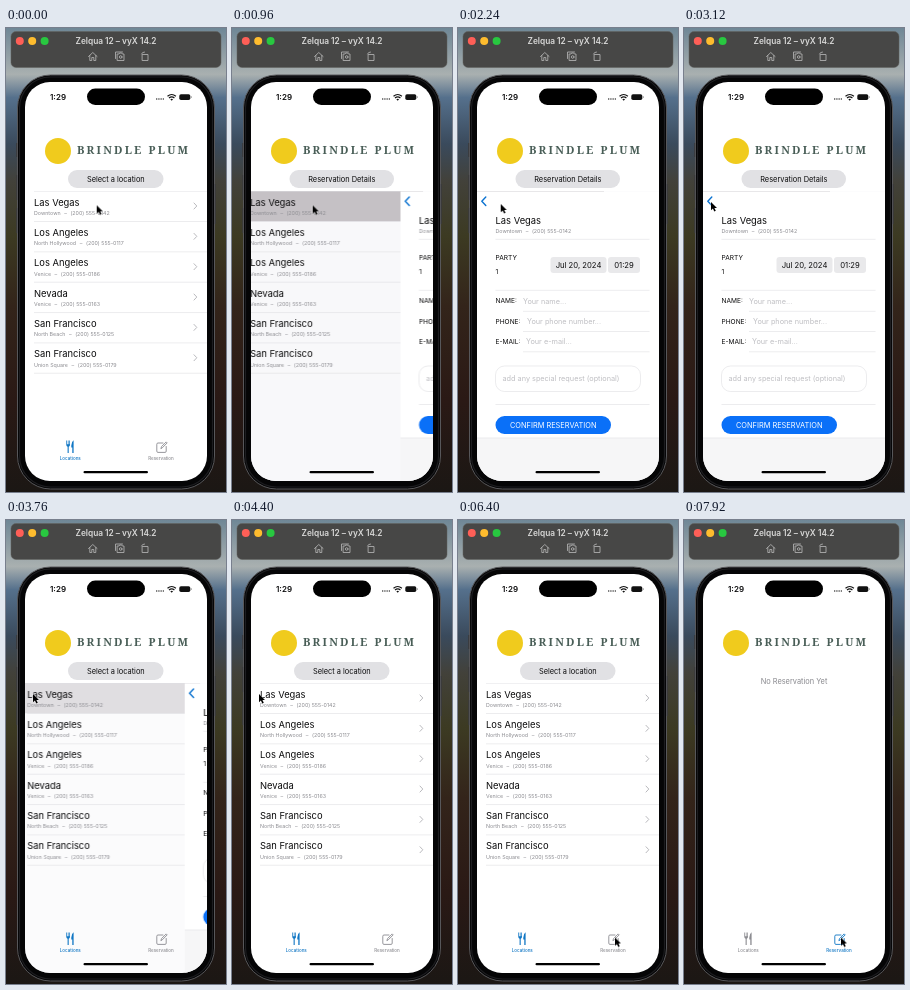
Write an HTML page that moves like this. It is 220 px wide and 464 px high and loops after 8 s.

```html
<!DOCTYPE html>
<html lang="en">
<head>
<meta charset="utf-8">
<title>Reservation app</title>
<style>
html, body { margin: 0; width: 100%; height: 100%; overflow: hidden; background: #1c1914; }
svg { display: block; width: 220px; height: 464px; }
text { font-family: Inter, Roboto, sans-serif; fill: #0c0c0d; }
.mid { text-anchor: middle; }
.city { font-size: 9.4px; }
.sub { font-size: 5.3px; fill: #8b8b90; }
.body { font-size: 7.4px; }
.label { font-size: 6.6px; }
.hint { font-size: 7.3px; fill: #bfbfc3; }
.tab { font-size: 4.5px; text-anchor: middle; font-weight: 500; }
.line { stroke: #dfdfe2; stroke-width: .6; fill: none; }
.icon { fill: none; stroke: #adadad; stroke-width: .9; stroke-linejoin: round; stroke-linecap: round; }
.tint { color: #0f76c4; }
.idle { color: #8c8c91; }
.tint text, .idle text { fill: currentColor; }

.list, .detail, .dim, .pressed, .bar, .pick, .info, .first, .second, .cursor {
  animation: 8s linear infinite;
}
.list { animation-name: list; }
.detail { animation-name: detail; }
.dim { animation-name: dim; }
.pressed { animation-name: pressed; }
.bar { animation-name: bar; }
.pick { animation-name: pick; }
.info { animation-name: info; }
.first { animation-name: first; }
.second { animation-name: second; }
.cursor { animation-name: cursor; }
.info, .bar, .pick { animation-timing-function: step-end; }
.first, .second { animation-timing-function: step-end; }

@keyframes list {
  0%, 11.4% { transform: none; animation-timing-function: cubic-bezier(.3, .5, .2, 1); }
  18%, 43.8% { transform: translateX(-55px); animation-timing-function: cubic-bezier(.3, .5, .2, 1); }
  50.4%, 100% { transform: none; }
}
@keyframes detail {
  0%, 11.4% { transform: translateX(182px); animation-timing-function: cubic-bezier(.3, .5, .2, 1); }
  18%, 43.8% { transform: none; animation-timing-function: cubic-bezier(.3, .5, .2, 1); }
  50.4%, 100% { transform: translateX(182px); }
}
@keyframes dim {
  0%, 11.3% { opacity: 0; }
  11.8%, 43.8% { opacity: 1; }
  50.4%, 100% { opacity: 0; }
}
@keyframes pressed {
  0%, 10.4% { opacity: 0; }
  10.9%, 44% { opacity: 1; }
  50%, 100% { opacity: 0; }
}
@keyframes bar { 0% { opacity: 1; } 11.4% { opacity: 0; } 43.8%, 100% { opacity: 1; } }
@keyframes pick { 0% { opacity: 1; } 11.4% { opacity: 0; } 43.8% { opacity: 1; } 88%, 100% { opacity: 0; } }
@keyframes info { 0% { opacity: 0; } 11.4% { opacity: 1; } 43.8%, 100% { opacity: 0; } }
@keyframes first { 0% { opacity: 1; } 88%, 100% { opacity: 0; } }
@keyframes second { 0% { opacity: 0; } 88%, 100% { opacity: 1; } }
@keyframes cursor {
  0%, 2% { transform: translate(90.7px, 177.3px); animation-timing-function: ease-in-out; }
  8%, 19% { transform: translate(80.7px, 177.3px); animation-timing-function: ease-in-out; }
  27%, 30% { transform: translate(42.7px, 176px); animation-timing-function: ease-in-out; }
  37%, 57% { transform: translate(27px, 174px); animation-timing-function: ease-in-out; }
  77%, 100% { transform: translate(157px, 417.5px); }
}
</style>
</head>
<body>
<svg viewBox="0 0 220 464">
  <defs>
    <linearGradient id="land" x2="0" y2="1">
      <stop offset="0" stop-color="#6f8796"/>
      <stop offset=".1" stop-color="#a9b0b0"/>
      <stop offset=".15" stop-color="#55708c"/>
      <stop offset=".25" stop-color="#3a4a5c"/>
      <stop offset=".33" stop-color="#42413a"/>
      <stop offset=".45" stop-color="#3c3a22"/>
      <stop offset=".6" stop-color="#33241a"/>
      <stop offset=".8" stop-color="#2a1915"/>
      <stop offset="1" stop-color="#1b1714"/>
    </linearGradient>
    <clipPath id="screen"><rect x="19" y="54" width="182" height="399" rx="25"/></clipPath>
    <g id="fork" fill="currentColor">
      <path d="M60.3 412.5v4.2q0 1.6 1.3 2v6.3h1.1v-6.3q1.3-.4 1.3-2v-4.2h-.7v3.8h-.8v-3.8h-.7v3.8h-.8v-3.8z"/>
      <path d="M67.6 412.2q-2.3 1.600-2.3 5.200v2h1v5.600h1.300z"/>
    </g>
    <g id="note" fill="none" stroke="currentColor" stroke-width=".9" stroke-linejoin="round" stroke-linecap="round">
      <path d="M157 415h-5q-1.200 0-1.200 1.200v7q0 1.200 1.200 1.200h7q1.200 0 1.200-1.200v-4.700"/>
      <path d="M155 420.300l.5-1.700 4.700-4.700 1 1-4.700 4.700z"/>
    </g>
  </defs>

  <rect width="220" height="464" fill="url(#land)"/>

  <!-- simulator toolbar -->
  <rect x="5" y="3.500" width="210" height="36" rx="5" fill="#474746" stroke="#62625f" stroke-width=".5"/>
  <circle cx="13.800" cy="13" r="4" fill="#fe5f57"/>
  <circle cx="26.200" cy="13" r="4" fill="#febc2e"/>
  <circle cx="38.600" cy="13" r="4" fill="#28c840"/>
  <text class="mid" x="110" y="16" font-size="8.300" font-weight="600" style="fill:#d9d9d8">Zelqua 12 – vyX 14.2</text>
  <g class="icon">
    <path d="M82.500 28.500l4.300-4 4.300 4M83.800 27.500v5h2v-3h2v3h2v-5"/>
    <path d="M109.500 30.500v-6.500h7M111.500 26h1.500l.7-1h2l.7 1h1.600v6.500h-6.500z"/>
    <circle cx="114.700" cy="29" r="1.300"/>
    <path d="M136.500 26.500h5.500v6h-5.500zM135.500 26q.5-2 3-2"/>
  </g>

  <!-- phone body -->
  <rect x="11.500" y="47" width="197" height="414" rx="33" fill="#050506" stroke="#57575a" stroke-width="1"/>
  <rect x="13.500" y="49" width="193" height="410" rx="31" fill="none" stroke="#1d1d20" stroke-width="1.200"/>
  <path d="M10.700 115v14M10.700 147v25M10.700 180v25M209.300 156v40" stroke="#3a3a3c" stroke-width="1"/>

  <g clip-path="url(#screen)">
    <rect x="19" y="54" width="182" height="399" fill="#fff"/>

    <g class="first">
      <rect class="dim" x="19" y="163" width="182" height="290" fill="#f8f8fa"/>
      <g class="list">
        <rect class="pressed" x="19" y="163" width="182" height="30.300" fill="#c5c1c5"/>
        <path class="line" d="M28 163.300h173"/>
        <g id="rows"></g>
      </g>

      <g class="detail">
        <rect x="19" y="163.500" width="182" height="290" fill="#fff"/>
        <path d="M27.800 169l-4 4.200 4 4.200" fill="none" stroke="#0a72d0" stroke-width="1.400" stroke-linecap="round" stroke-linejoin="round"/>
        <text class="city" x="37.500" y="195.600">Las Vegas</text>
        <text class="sub" x="37.500" y="205">Downtown<tspan dx="3.600">–</tspan><tspan dx="3.600">(200) 555-0142</tspan></text>
        <path class="line" d="M37.500 211.300h154M37.500 262.300h154M65 283.300h126.500M65 303.500h126.500M65 323.800h126.500M37.500 376.500h154"/>
        <text class="label" x="37.500" y="232.400">PARTY</text>
        <text class="label" x="37.500" y="246">1</text>
        <rect x="92.500" y="229" width="56" height="16" rx="3" fill="#e9e9eb"/>
        <rect x="150" y="229" width="32" height="16" rx="3" fill="#e9e9eb"/>
        <text class="mid" x="120.500" y="239.800" font-size="7.700">Jul 20, 2024</text>
        <text class="mid" x="166" y="239.800" font-size="7.700">01:29</text>
        <text class="label" x="37.500" y="275.400">NAME:</text>
        <text class="hint" x="65" y="275.600">Your name...</text>
        <text class="label" x="37.500" y="295.700">PHONE:</text>
        <text class="hint" x="69" y="295.900">Your phone number...</text>
        <text class="label" x="37.500" y="316">E-MAIL:</text>
        <text class="hint" x="68" y="316.200">Your e-mail...</text>
        <rect class="line" x="37.500" y="338" width="145" height="25.500" rx="9"/>
        <text class="hint" x="44.500" y="353">add any special request (optional)</text>
        <rect x="37.500" y="388" width="115.500" height="18" rx="9" fill="#0a70f8"/>
        <text class="mid body" x="95.200" y="399.700" style="fill:#fff">CONFIRM RESERVATION</text>
        <rect x="19" y="410" width="182" height="43" fill="#f6f6f7"/>
        <path class="line" d="M19 410h182"/>
      </g>
    </g>

    <!-- header -->
    <circle cx="52" cy="123" r="13" fill="#f0cb1d"/>
    <text x="71" y="126" font-size="11" font-weight="700" letter-spacing="2.200" style="font-family:'Noto Serif',serif;fill:#495e57">BRINDLE PLUM</text>
    <g class="pick">
      <rect x="62" y="142" width="95.500" height="18" rx="9" fill="#e1e1e4"/>
      <text class="mid body" x="109.800" y="153.700">Select a location</text>
    </g>
    <g class="info">
      <rect x="57.500" y="142" width="104.500" height="18" rx="9" fill="#e1e1e4"/>
      <text class="mid body" x="109.800" y="153.700">Reservation Details</text>
    </g>
    <text class="mid body second" x="110" y="163.700" style="fill:#89898e">No Reservation Yet</text>

    <!-- tab bar -->
    <g class="bar">
      <g class="first">
        <g class="tint"><use href="#fork"/><text class="tab" x="64.300" y="431.500">Locations</text></g>
        <g class="idle"><use href="#note"/><text class="tab" x="155" y="431.500">Reservation</text></g>
      </g>
      <g class="second">
        <g class="idle"><use href="#fork"/><text class="tab" x="64.300" y="431.500">Locations</text></g>
        <g class="tint"><use href="#note"/><text class="tab" x="155" y="431.500">Reservation</text></g>
      </g>
    </g>

    <!-- status bar -->
    <text class="mid" x="52" y="72" font-size="8" font-weight="600">1:29</text>
    <rect x="81" y="60.500" width="58" height="16.500" rx="8.250" fill="#000"/>
    <path d="M150 71h8" stroke="#555" stroke-width="1.300" stroke-dasharray="1.300 .95"/>
    <g fill="none" stroke="#111" stroke-width="1.200">
      <path d="M161.500 68.200q4.200-3.400 8.400 0M163 70q2.700-2.200 5.400 0"/>
    </g>
    <path d="M164.300 71.200q1.400-1 2.800 0l-1.400 1.500z" fill="#111"/>
    <rect x="173.300" y="66.300" width="11" height="5.600" rx="1.700" fill="#111"/>
    <path d="M185.300 68.200v1.800" stroke="#888" stroke-width=".8"/>
    <rect x="77.500" y="443" width="64.500" height="2.300" rx="1.150" fill="#000"/>
  </g>

  <path class="cursor" d="M0 0v8.200l1.900-1.700 1.400 3 1.500-.7-1.400-2.900h2.600z" fill="#000" stroke="#fff" stroke-width=".6" paint-order="stroke"/>
</svg>
<script>
const places = [
  ["Las Vegas", "Downtown", "(200) 555-0142"],
  ["Los Angeles", "North Hollywood", "(200) 555-0117"],
  ["Los Angeles", "Venice", "(200) 555-0186"],
  ["Nevada", "Venice", "(200) 555-0163"],
  ["San Francisco", "North Beach", "(200) 555-0125"],
  ["San Francisco", "Union Square", "(200) 555-0179"]
];
document.getElementById("rows").innerHTML = places.map(([city, area, phone], i) => `
  <g transform="translate(0 ${i * 30.35})">
    <text class="city" x="28" y="177.600">${city}</text>
    <text class="sub" x="28" y="186.900">${area}<tspan dx="3.600">–</tspan><tspan dx="3.600">${phone}</tspan></text>
    <path class="line" d="M28 193.500h173"/>
    <path d="M188 175l2.800 3-2.800 3" fill="none" stroke="#b9b9bd" stroke-width="1" stroke-linecap="round"/>
  </g>`).join("");
</script>
</body>
</html>
```
